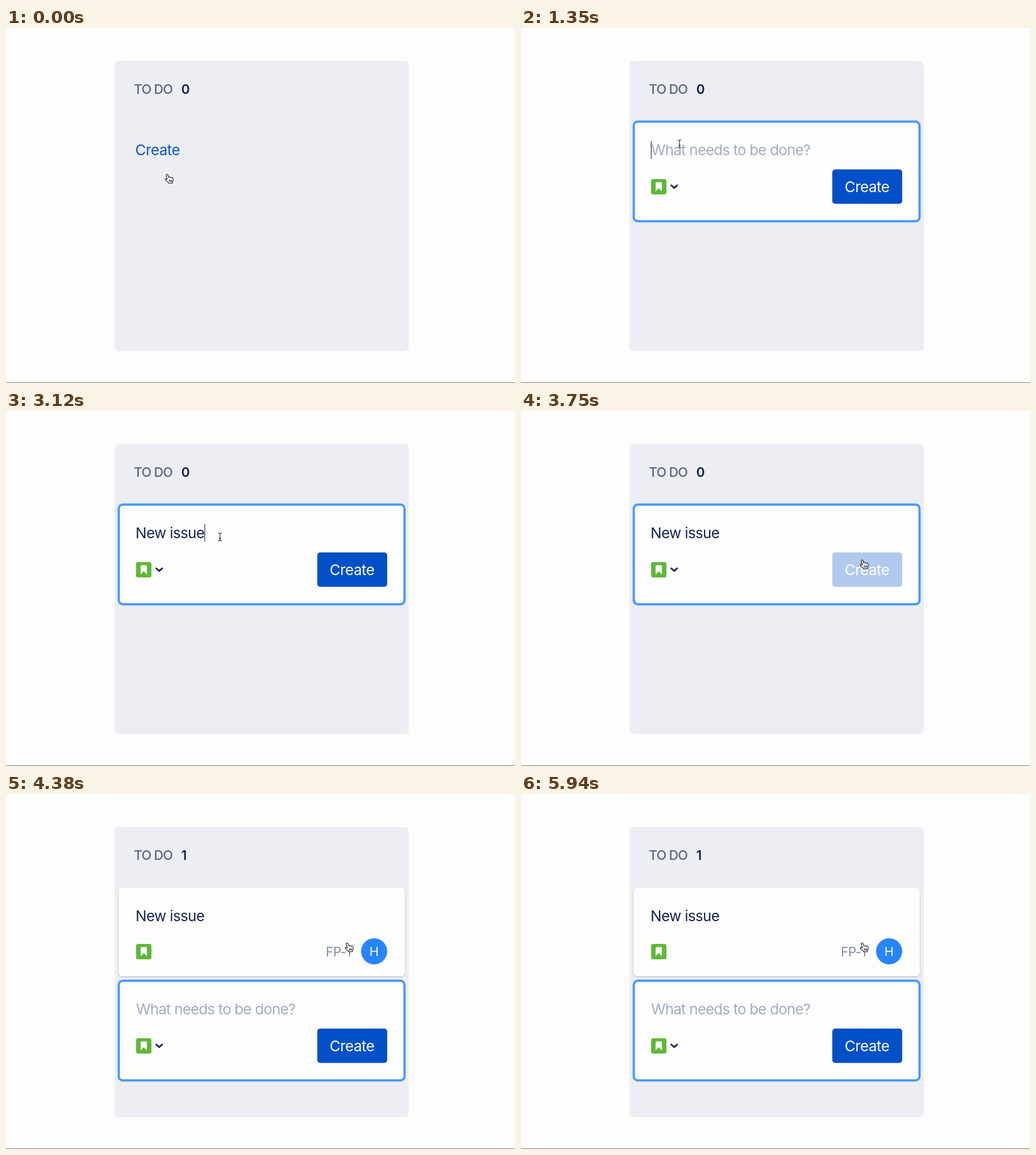
Write an HTML page that moves like this. It is 896 by 625 pixels and loops after 5970 ms.

```html
<!DOCTYPE html>
<html lang="en">
<head>
<meta charset="utf-8">
<title>Creating an issue</title>
<style>
  html, body { margin: 0; width: 100%; height: 100%; overflow: hidden; background: #fdfdfd; }
  svg { display: block; width: 896px; height: 625px; }
  text { font-family: Inter, Roboto, "Liberation Sans", sans-serif; font-size: 26px; white-space: pre; }
  .head { font-size: 23px; font-weight: 500; letter-spacing: -.85px; fill: #5b6780; }
  .count { font-size: 23px; font-weight: 600; fill: #14214d; }
  .create { letter-spacing: -.5px; }
  .title { letter-spacing: -.65px; fill: #172650; }
  .hint { letter-spacing: -.85px; fill: #a3adbe; }
  .key { font-size: 22.5px; letter-spacing: -.4px; fill: #8290a3; }
  .initial { font-size: 22px; fill: #fff; text-anchor: middle; }
  .card { filter: drop-shadow(0 1px 1px rgba(9, 30, 66, .3)); }
</style>
</head>
<body>
<svg viewBox="0 0 896 625">
  <defs>
    <g id="story">
      <rect width="27" height="27" rx="3.5" fill="#5fb83a"/>
      <path d="M8 7.2q0-1.7 1.7-1.7h7.6q1.7 0 1.7 1.7v14.3l-5.5-5.6L8 21.5z" fill="#fff"/>
    </g>
  </defs>

  <rect width="896" height="625" fill="#fdfdfd"/>
  <rect y="624" width="896" height="1" fill="#777"/>
  <rect x="191" y="58" width="518" height="511" rx="8" fill="#eceef3"/>
  <text class="head" x="225" y="116">TO DO</text>
  <text class="count" id="count" x="308.5" y="116">0</text>

  <text class="create" id="link" x="227.5" y="224" fill="#0854d0">Create</text>

  <g id="card">
    <rect class="card" x="198" y="165" width="504" height="156" rx="7" fill="#fdfdfd"/>
    <text class="title" x="228" y="224">New issue</text>
    <use href="#story" x="229" y="264"/>
    <text class="key" x="563" y="286">FP-1</text>
    <circle cx="648" cy="277" r="23" fill="#2684ff"/>
    <text class="initial" x="648" y="285.3">H</text>
  </g>

  <g id="form">
    <rect x="198.5" y="164.8" width="503" height="175.4" rx="7" fill="#fdfdfd" stroke="#4a98fc" stroke-width="4"/>
    <text class="hint" id="hint" x="229" y="224">What needs to be done?</text>
    <text class="title" id="typed" x="228" y="224"></text>
    <rect id="caret" y="199" width="1.2" height="31" fill="#172650"/>
    <use href="#story" x="229" y="266"/>
    <path d="M264.5 277l5.2 4.6 5.2-4.6" fill="none" stroke="#172650" stroke-width="3" stroke-linecap="round" stroke-linejoin="round"/>
    <rect id="button" x="548" y="249" width="123" height="60.5" rx="5"/>
    <text class="create" x="569.7" y="289" fill="#fff">Create</text>
  </g>

  <g id="hand" stroke="#111" stroke-width="1.1" stroke-linecap="round" stroke-linejoin="round">
    <path fill="#fff" d="M-2.5 1.5C-3-.3-.3-1 .4.8L2 5C3 4.2 4.3 4.4 4.8 5.2 5.8 4.5 7 4.8 7.4 5.8 8.6 5.4 9.4 6 9.6 7 10 9.5 9.8 11.5 8.6 13.5L8.4 15.3H1.6C1.2 13.5-1.5 11.8-4 9.3-5 8-3.7 6.6-2.2 7.6L-.7 8.7z"/>
    <path fill="none" d="M2.8 9.8v3M4.9 9.8v3M7 9.8v3"/>
  </g>
  <g id="beam" fill="none" stroke-linecap="round">
    <path id="stem" d="M-3-7q2.4 0 3 1.3Q.6-7 3-7M-3 7q2.4 0 3-1.3Q.6 7 3 7M0-5.7V5.7M-1.4 2.5h2.8" stroke="#fff" stroke-width="2.6"/>
    <use href="#stem" style="stroke:#111"/>
    <path d="M-3-7q2.4 0 3 1.3Q.6-7 3-7M-3 7q2.4 0 3-1.3Q.6 7 3 7M0-5.7V5.7M-1.4 2.5h2.8" stroke="#111" stroke-width="1.1"/>
  </g>
</svg>
<script>
  const LOOP = 5970;
  const OPEN = 1140, TYPE = 1500, KEY = 150, CLICK = 3690, DONE = 3960;
  const TITLE = "New issue";
  const LAST_KEY = TYPE + KEY * (TITLE.length - 1);
  const POINTER = [
    [0, 284.5, 258], [150, 284.5, 258], [840, 279, 204],
    [2880, 279, 204], [3540, 601.5, 262.5], [LOOP, 601.5, 262.5]
  ];

  const el = {};
  document.querySelectorAll("svg [id]").forEach(n => el[n.id] = n);
  el.beam.querySelector("use").remove();

  const show = (node, on) => node.setAttribute("display", on ? "inline" : "none");
  const ease = p => p * p * (3 - 2 * p);

  function pointerAt(t) {
    const i = POINTER.findIndex(p => p[0] > t);
    const [t0, x0, y0] = POINTER[i - 1], [t1, x1, y1] = POINTER[i];
    const p = ease((t - t0) / (t1 - t0));
    return [x0 + (x1 - x0) * p, y0 + (y1 - y0) * p];
  }

  function caretOn(t) {
    if (t < OPEN || t >= CLICK) return false;
    const since = t < TYPE ? t - OPEN : Math.max(0, t - LAST_KEY);
    return since % 1000 < 500;
  }

  function draw(t) {
    const open = t >= OPEN, done = t >= DONE;
    const keys = done || t < TYPE ? 0 : Math.min(TITLE.length, 1 + Math.floor((t - TYPE) / KEY));

    show(el.link, !open);
    show(el.form, open);
    show(el.card, done);
    el.form.setAttribute("transform", `translate(0 ${done ? 164 : 0})`);
    el.count.textContent = done ? 1 : 0;

    el.typed.textContent = TITLE.slice(0, keys);
    show(el.hint, !keys);
    show(el.caret, caretOn(t));
    el.caret.setAttribute("x", keys ? 228 + el.typed.getComputedTextLength() : 228.6);
    el.button.setAttribute("fill", t >= CLICK && !done ? "#b2c9ee" : "#0150c8");

    const [x, y] = pointerAt(t);
    const hidden = t >= TYPE && t < 2880;
    const overField = open && x < 548;
    show(el.hand, !hidden && !overField);
    show(el.beam, !hidden && overField);
    for (const cursor of [el.hand, el.beam]) cursor.setAttribute("transform", `translate(${x} ${y})`);
  }

  const start = performance.now();
  function tick() {
    draw((performance.now() - start) % LOOP);
    requestAnimationFrame(tick);
  }
  tick();
</script>
</body>
</html>
```
